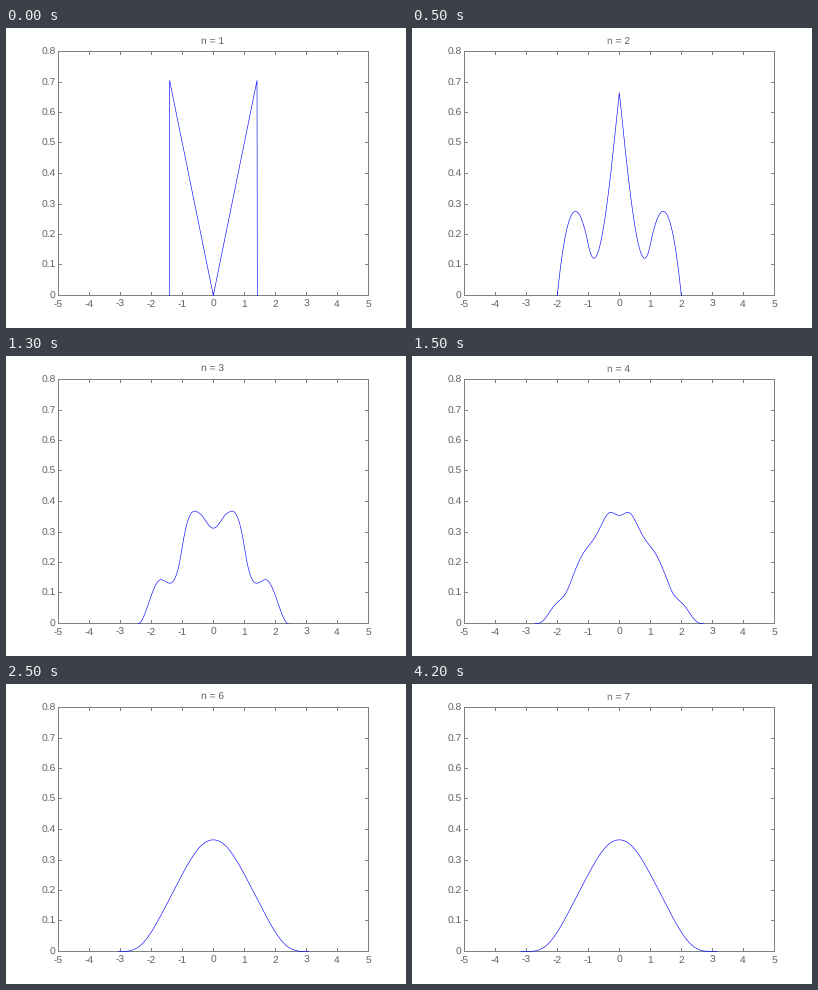
Recreate the animation shown at these times as a matplotlib script. Size 400 px wide and 300 px high, loop 5000 ms.

```python
import numpy as np
import matplotlib.pyplot as plt
from matplotlib.animation import FuncAnimation

W, H, DPI = 400, 300, 72  # at 72 dpi one point is one pixel
LEFT, RIGHT, TOP, BOTTOM = 52, 362, 23, 267
CENTER, UNIT_X, UNIT_Y = 207, 31, 305
STEPS, FRAMES, INTERVAL = 7, 10, 500
AXIS_COLOR, TEXT_COLOR = "#808080", "#606060"
ROOT2 = np.sqrt(2)

plt.rcParams.update({
    "font.family": "Liberation Sans",
    "font.size": 10.3,
    "text.color": TEXT_COLOR,
    "text.hinting": "none",
})


def normalized_sums(count):
    """Densities of X1, (X1+X2)/sqrt(2), ... where X has density |x|/2."""
    h = ROOT2 / 300
    k = np.arange(-1100, 1101)
    x = k * h
    base = np.where(abs(k) <= 300, abs(x) / 2, 0)
    base[abs(k) == 300] /= 2  # trapezoid weight at the jump
    density = base
    curves = []
    half_width = ROOT2
    for n in range(count):
        samples = np.arange(-500, 501) * 0.01
        samples = samples[abs(samples) < half_width + 0.011]
        if n == 0:
            values = np.where(abs(samples) <= ROOT2, abs(samples) / 2, 0)
        else:
            values = np.interp(samples, x, density)
        curves.append((samples, values))
        total = np.convolve(density, base, mode="same") * h
        density = ROOT2 * np.interp(ROOT2 * x, x, total, left=0, right=0)
        half_width = half_width / ROOT2 + 1
    return curves


fig = plt.figure(figsize=(W / DPI, H / DPI), dpi=DPI, facecolor="white")
ax = fig.add_axes([0, 0, 1, 1])
ax.set_xlim(0, W)
ax.set_ylim(H, 0)
ax.set_axis_off()


def segment(x0, y0, x1, y1):
    ax.plot([x0, x1], [y0, y1], color=AXIS_COLOR, lw=1, antialiased=False,
            snap=True, solid_capstyle="projecting")


def draw_axes():
    for y in (TOP, BOTTOM):
        segment(LEFT, y, RIGHT, y)
    for x in (LEFT, RIGHT):
        segment(x, TOP, x, BOTTOM)
    for value in range(-5, 6):
        x = CENTER + UNIT_X * value
        segment(x, BOTTOM, x, BOTTOM - 3)
        segment(x, TOP, x, TOP + 3)
        ax.text(x, 279, str(value), ha="center", va="baseline")
    for tenth in range(9):
        y = round(BOTTOM - UNIT_Y * tenth / 10)
        segment(LEFT, y, LEFT + 3, y)
        segment(RIGHT, y, RIGHT - 3, y)
        ax.text(49.5, y + 4, f"{tenth / 10:g}", ha="right", va="baseline")


draw_axes()
curves = normalized_sums(STEPS)
line, = ax.plot([], [], color="blue", lw=0.6, snap=False, zorder=3)
title = ax.text(CENTER - 0.5, 16, "", ha="center", va="baseline")


def update(frame):
    step = min(frame, STEPS - 1)
    x, y = curves[step]
    line.set_data(CENTER + 0.3 + UNIT_X * x, BOTTOM + 0.5 - UNIT_Y * y)
    title.set_text(f"n = {step + 1}")
    return line, title


anim = FuncAnimation(fig, update, frames=FRAMES, interval=INTERVAL,
                     repeat=True, repeat_delay=0)
plt.show()
```
